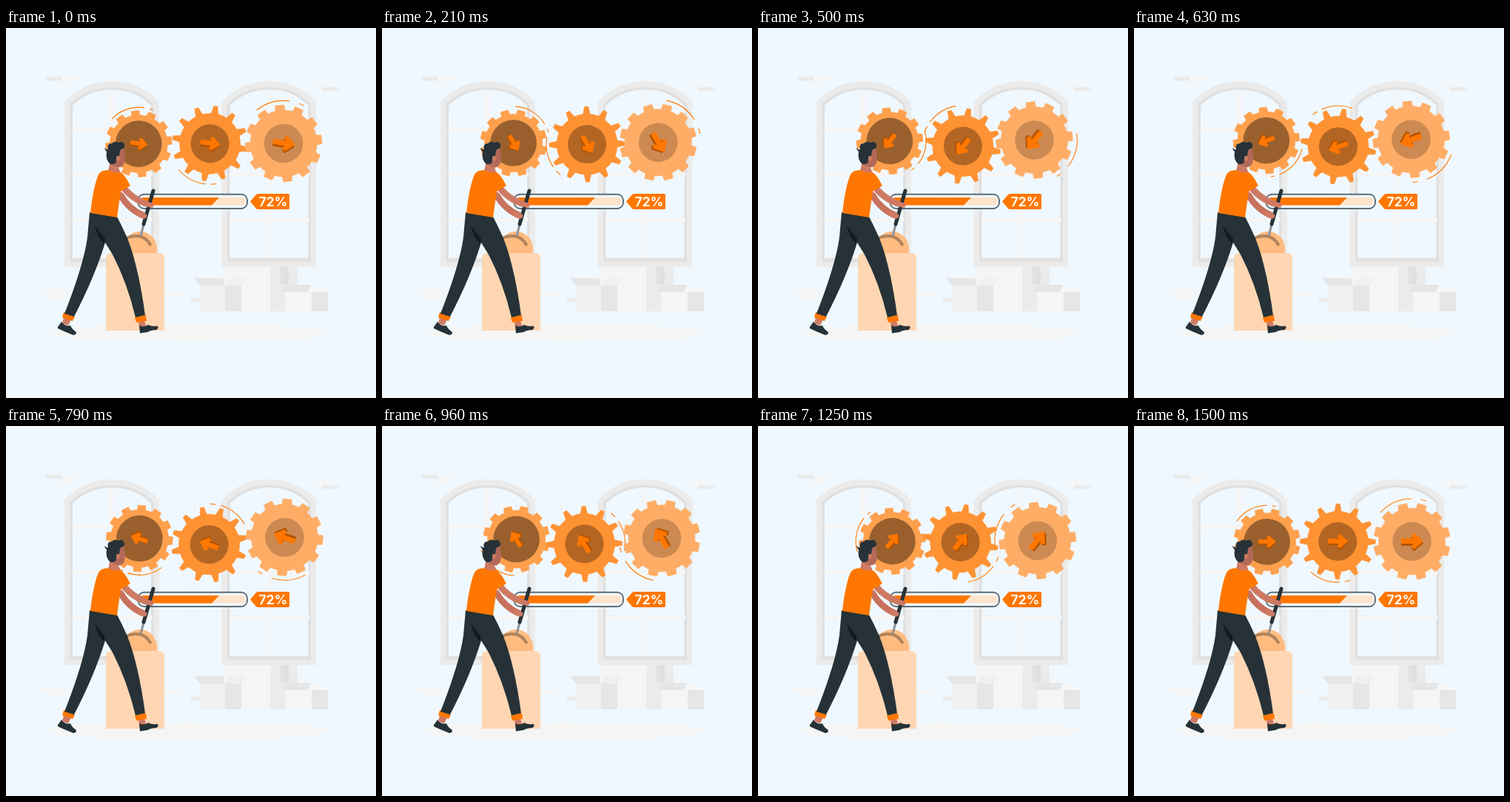
These frames come from a looping animation (500 px wide and 500 px high, 1540 ms). An HTML page:

```html
<!DOCTYPE html>
<html lang="en">
<head>
<meta charset="utf-8">
<title>Gears</title>
<style>
  html, body { margin: 0; width: 100%; height: 100%; overflow: hidden; background: #f0f8ff; }
  svg { display: block; width: 100%; height: 100%; }
  text { font: 700 17.2px Inter, sans-serif; }
</style>
</head>
<body>
<svg viewBox="0 0 500 500">
  <defs>
    <g id="window">
      <path fill="#ebebeb" d="M79 323V100Q104 72 143 72T207 100V323Z"/>
      <path fill="#e0e0e0" d="M86.500 316V103Q108 80 143 80T199.500 103V316Z"/>
      <path fill="#f0f8ff" d="M90 311V105Q111 83.500 143 83.500T196 105V311Z"/>
      <path stroke="#f5f5f5" stroke-width="5" d="M143 83V311"/>
      <path stroke="#f5f5f5" stroke-width="6" stroke-linecap="round" d="M92 136.500H195M92 198H195M92 259H195"/>
    </g>
    <path id="arrow" stroke-width="1.500" stroke-linejoin="round"
      d="M-12.300-2.500H4L0-6.200L2.800-8.700L12.800 0L2.800 8.700L0 6.200L4 2.500H-12.300Z"/>
  </defs>

  <!-- Room -->
  <g fill="none" stroke="#ebebeb" stroke-width=".4">
    <rect x="38.200" y="54.900" width="204.500" height="282.900" rx="5.700"/>
    <rect x="254.500" y="54.900" width="204.500" height="282.900" rx="5.700"/>
    <path d="M0 382.500H500"/>
  </g>
  <g fill="#f5f5f5">
    <ellipse cx="247" cy="412" rx="192" ry="12"/>
    <path fill="#ebebeb" d="M53 65.500H76V71.500H53Z"/>
    <path d="M78 66H98V72H78ZM74 73H89V79H74ZM418 73H440V79H418ZM48 352H88V358H48ZM56 360H85V366H56ZM213 357H237V363H213Z"/>
    <path fill="#ebebeb" d="M427 80H450V85H427ZM250 365H263V371H250Z"/>
  </g>
  <use href="#window"/>
  <use href="#window" x="212.500"/>

  <!-- Boxes -->
  <path fill="#f5f5f5" d="M296 323H357V383H296Z"/>
  <path fill="#ebebeb" d="M357 323H394V383H357Z"/>
  <path fill="#e0e0e0" d="M371 323H382V346H371Z"/>
  <path fill="#f0f0f0" d="M262 348H296V383H262ZM302 338H325L318 348H296Z"/>
  <path fill="#e6e6e6" d="M254 338H293L296 348H262ZM296 348H318V383H296Z"/>
  <path fill="#f5f5f5" d="M377 357H413V383H377ZM412 347L419 358H435L431 354Z"/>
  <path fill="#e6e6e6" d="M380 347H412L408 357H372ZM413 357H435V383H413Z"/>

  <g id="gears"></g>

  <!-- Progress bar -->
  <rect x="178.500" y="224.800" width="147.500" height="19.200" rx="8" fill="#f0f8ff" stroke="#5f6e78" stroke-width="1.900"/>
  <rect x="183" y="229" width="140" height="10.500" rx="3" fill="#ffe4cc"/>
  <path fill="#f70" d="M186 229H288L278 239.500H186Q183 239.500 183 236V232Q183 229 186 229Z"/>
  <path fill="#f70" d="M330 234.500L338 225Q339 224 341 224H381Q383 224 383 226V243Q383 245 381 245H341Q339 245 338 244Z"/>
  <text x="361" y="241" text-anchor="middle" fill="#fff">72%</text>

  <!-- Stand and lever -->
  <path fill="#ffbb80" d="M158 305V298A23 23 0 0 1 204 298V305Z"/>
  <path fill="none" stroke="#b3835a" stroke-width="4" d="M161 285Q168 281 177 281Q190 282 195.500 294"/>
  <path fill="#ffd6b3" d="M135 409V311Q135 304 142 304H207Q214 304 214 311V409Z"/>
  <path stroke="#8b9399" stroke-width="3" d="M187 262L182 281"/>
  <g fill="none" stroke-linecap="round">
    <path stroke="#c8715c" stroke-width="8.500" d="M155 226Q166 245 185 253"/>
    <path stroke="#263238" stroke-width="5" d="M199 220L186 265"/>
    <path stroke="#ce7a63" stroke-width="8.500" d="M159 216Q170 230 188 237"/>
    <path stroke="#ce7a63" stroke-width="7" d="M187 237L196 239.500M181 252L187 254"/>
  </g>

  <!-- Person -->
  <path fill="#ce7a63" d="M78 391L88 394L84 402L76 399ZM179 396L187 395L189 403L180 404Z"/>
  <path fill="#263238" d="M70 404L75 397Q80 404 87 402Q90 408 94 410Q97 414 91 415Q83 412 70 406ZM180 402Q187 405 192 401Q198 404 204 402.500Q208 405 203 408Q196 408 191 411L181 412.500Z"/>
  <path fill="#f70" d="M78 384L93 390L90 396L76 391ZM174 391L189 388L190 396L176 398Z"/>
  <path fill="#263238" d="M113 249L150 255Q157 268 164 284Q179 322 188 388L175 391Q164 345 144 306L134 290Q120 336 92 390L79 386Q105 320 110 283Z"/>
  <path fill="#101a20" d="M120 267Q123 282 132 291L134 285Z"/>
  <path fill="#ce7a63" d="M141 180L138 193Q145 199 155 196L151 186Z"/>
  <path fill="#f70" d="M125 198Q128 192 138 192Q147 197 155 195Q161 199 168 213L155 221L150 256L114 250Q118 214 125 198Z"/>
  <path fill="#b2695a" d="M147 166L159 162L161 175Q161 186 155 188Q147 189 142 183Z"/>
  <path fill="#263238" d="M136 167Q132 163 134 162Q135 165 138 164Q136 156 143 156Q147 152 152 155Q159 152 160 159Q161 163 155 164Q153 169 153 174Q148 172 149 181Q146 185 141 184Q134 178 136 167Z"/>
  <path fill="#ce7a63" d="M149 174Q153 171 154 175Q154 180 150 180Z"/>
</svg>
<script>
const LOOP = 1540, STEPS = 37, SLOW_FROM = 30;
const rad = Math.PI / 180;

// x, y: pivot; dy: gear centre below the pivot; arcs: pairs of angles
const gears = [
  { x: 179.7, y: 154.2, dy: 2.3, tip: 45, body: 39, teeth: 12, phase: 15, base: 8.5, top: 6.5,
    hub: 31.3, fill: '#ffa04d', dark: '#99602e', scale: .88, ring: 49.3, arcs: [[214, 270], [278, 284]] },
  { x: 275.3, y: 158.2, dy: -2.1, tip: 51, body: 41, teeth: 12, phase: 0, base: 6.5, top: 2.8,
    hub: 26, fill: '#ff9233', dark: '#b36624', scale: 1, ring: 55, arcs: [[87, 131], [72, 80]] },
  { x: 375.6, y: 153.2, dy: 2.8, tip: 52, body: 45, teeth: 12, phase: 15, base: 8.5, top: 6.5,
    hub: 26.3, fill: '#ffad66', dark: '#cc8a52', scale: 1.12, ring: 57.8, arcs: [[222, 269], [282, 289]] }
];

const polar = (r, deg) =>
  (r * Math.cos(deg * rad)).toFixed(2) + ' ' + (r * Math.sin(deg * rad)).toFixed(2);

function gearPath({ tip, body, teeth, phase, base, top }) {
  let d = '';
  for (let i = 0; i < teeth; i++) {
    const a = phase - 90 + i * 360 / teeth;
    d += `${i ? `A${body} ${body} 0 0 1 ` : 'M'}${polar(body, a - base)}` +
      `L${polar(tip, a - top)}L${polar(tip, a + top)}L${polar(body, a + base)}`;
  }
  return d + 'Z';
}

const arcPath = (r, [from, to]) => `M${polar(r, from)}A${r} ${r} 0 0 1 ${polar(r, to)}`;

const layer = document.getElementById('gears');
layer.innerHTML = gears.map(g => `<g><g transform="translate(${g.x} ${g.y + g.dy})">
  <path d="${gearPath(g)}" fill="${g.fill}" stroke="${g.fill}" stroke-width=".6" stroke-linejoin="round"/>
  <circle r="${g.hub}" fill="${g.dark}"/>
  <g transform="scale(${g.scale})">
    <use href="#arrow" y="2" fill="#b35300" stroke="#b35300"/>
    <use href="#arrow" y="-.5" fill="#f70" stroke="#f70"/>
  </g>
  <path d="${g.arcs.map(a => arcPath(g.ring, a)).join('')}" fill="none" stroke="#f70" stroke-width="1.100"/>
</g></g>`).join('');

// Ten degrees per step, a little slower towards the end of the turn
function turn(step) {
  const slow = Math.max(0, step - SLOW_FROM);
  return 9 + (step - slow) * 10 + slow * (360 - SLOW_FROM * 10) / (STEPS - SLOW_FROM);
}

const start = performance.now();
function draw() {
  const time = (performance.now() - start) % LOOP;
  const angle = turn(Math.floor(time / LOOP * STEPS));
  gears.forEach((g, i) =>
    layer.children[i].setAttribute('transform', `rotate(${angle} ${g.x} ${g.y})`));
  requestAnimationFrame(draw);
}
draw();
</script>
</body>
</html>
```
